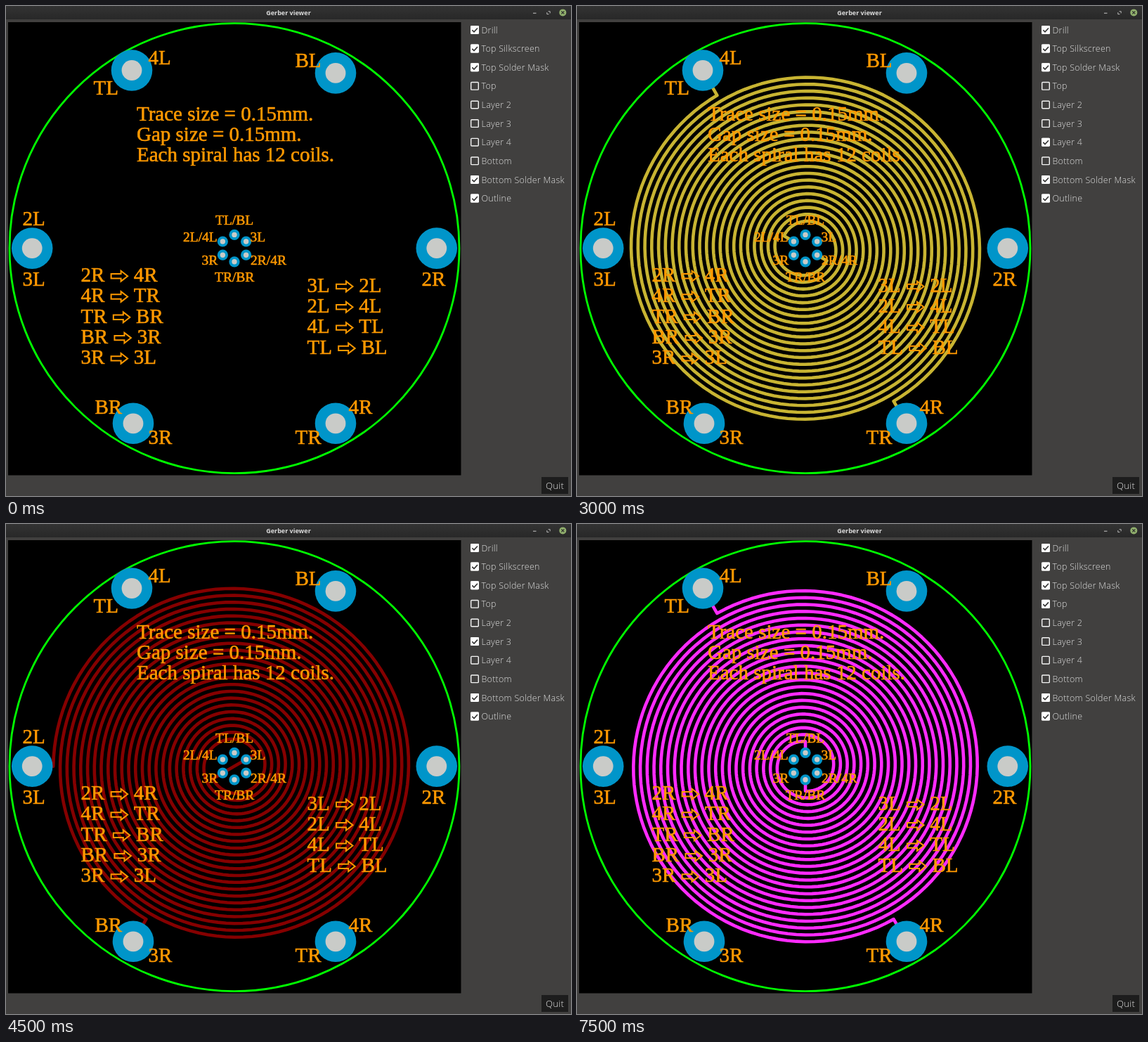
An HTML page that plays this animation: 804 px wide and 697 px high, repeating every 9 s.

```html
<!DOCTYPE html>
<html lang="en">
<head>
<meta charset="utf-8">
<title>Gerber viewer</title>
<style>
html, body { margin: 0; width: 100%; height: 100%; overflow: hidden; background: #41403f; }
svg { display: block; width: 804px; height: 697px; }
.silk { font-family: "Liberation Serif", serif; fill: #ff9900; stroke: #ff9900; stroke-width: .6; }
.ui { font-family: "Open Sans", sans-serif; font-weight: 300; font-size: 12.5px; fill: #dedede; }
.title { font: bold 9px "Noto Sans", sans-serif; fill: #dadada; text-anchor: middle; }
</style>
</head>
<body>
<svg id="stage" viewBox="0 0 804 697" xmlns="http://www.w3.org/2000/svg">
  <defs>
    <linearGradient id="bar" x2="0" y2="1">
      <stop stop-color="#333333"/><stop offset="1" stop-color="#282828"/>
    </linearGradient>
  </defs>
  <rect width="804" height="697" fill="#41403f"/>
  <rect width="804" height="19" fill="url(#bar)"/>
  <text class="title" x="402" y="13">Gerber viewer</text>
  <g fill="none" stroke="#c8c8c8">
    <path d="M750 10.2h4.5"/>
    <path d="M771.6 7.7h2.6v2.6M769.8 9v2.6h2.6" stroke-width=".9"/>
  </g>
  <circle cx="792.3" cy="9.4" r="5" fill="#91b06d"/>
  <path d="M790.3 7.4l4 4m0-4l-4 4" stroke="#2b2b2b" stroke-width="1.2"/>
  <rect x="3" y="23" width="644.5" height="644.5"/>
  <g id="board"></g>
  <g id="panel"></g>
  <rect x="762" y="670" width="38" height="24" fill="#1d1d1d"/>
  <text class="ui" x="768" y="686.5" style="font-size:13.2px" letter-spacing=".25">Quit</text>
</svg>
<script>
const CX = 325, CY = 344.6, MM = 32;
const R_IN = 1.1 * MM, R_OUT = 7.85 * MM;
const PITCH = (R_OUT - R_IN) / (11 * 360 + 30);
const STEP = 1500;
const board = document.getElementById("board");
const panel = document.getElementById("panel");

function add(parent, tag, attrs, text) {
  const el = document.createElementNS("http://www.w3.org/2000/svg", tag);
  for (const key in attrs) el.setAttribute(key, attrs[key]);
  if (text) el.textContent = text;
  parent.appendChild(el);
  return el;
}

function polar(r, deg) {
  const a = deg * Math.PI / 180;
  return (CX + r * Math.cos(a)).toFixed(2) + " " + (CY - r * Math.sin(a)).toFixed(2);
}

// One coil: inner stub, spiral growing by PITCH per degree, outer stub to the pad.
function coil(start, dir, extra, inner) {
  const sweep = 11 * 360 + extra;
  const pts = [polar(inner, start)];
  for (let a = 0; a <= sweep; a += 3) pts.push(polar(R_IN + PITCH * a, start + dir * a));
  pts.push(polar(9 * MM, start + dir * sweep));
  return "M" + pts.join("L");
}

function copper(color, dir, arms, inner = 0.6 * MM) {
  return add(board, "path", {
    d: arms.map(([start, extra]) => coil(start, dir, extra, inner)).join(""),
    fill: "none", stroke: color, "stroke-width": 4.6,
    "stroke-linecap": "round", "stroke-linejoin": "round"
  });
}

const layers = [
  { row: 7, path: copper("#2b2dff", -1, [[90, 30], [270, 30]]) },
  { row: 6, path: copper("#c8b432", -1, [[150, 30], [330, 30]]) },
  { row: 5, path: copper("#850000", 1, [[210, 30], [30, 150]], 0) },
  { row: 4, path: copper("#00008b", 1, [[150, 30], [330, 30]]) },
  { row: 3, path: copper("#ff2bff", 1, [[90, 30], [270, 30]]) }
];

add(board, "circle", { cx: CX, cy: CY, r: 10 * MM, fill: "none", stroke: "#00ff00", "stroke-width": 2.8 });

function pad(cx, cy, r, hole) {
  add(board, "circle", { cx, cy, r, fill: "#0095c9" });
  add(board, "circle", { cx, cy, r: hole, fill: "#c9cbc8" });
}
[[179, 91.5], [469, 95.4], [37.2, CY], [612.8, CY], [181, 593.8], [469, 593.8]]
  .forEach(([x, y]) => pad(x, y, 29.3, 14.4));
for (let a = 30; a < 390; a += 60) pad(...polar(0.6 * MM, a).split(" "), 7.6, 3.7);

function silk(x, y, text, size = 29) {
  return add(board, "text", { class: "silk", x, y, "font-size": size }, text);
}
[[202.5, 82.5, "4L"], [124.5, 126, "TL"], [411.5, 86.5, "BL"], [23.5, 311.5, "2L"],
 [23.5, 397.5, "3L"], [591.5, 397.5, "2R"], [126.5, 579.5, "BR"], [202.5, 622.5, "3R"],
 [487.5, 579.5, "4R"], [411.5, 622.5, "TR"]].forEach(l => silk(...l));
[[298, 311, "TL/BL"], [252, 335, "2L/4L"], [347.5, 335, "3L"], [278.5, 367.5, "3R"],
 [348, 367.5, "2R/4R"], [297, 391.5, "TR/BR"]].forEach(l => silk(...l, 19.5));
["Trace size = 0.15mm.", "Gap size = 0.15mm.", "Each spiral has 12 coils."]
  .forEach((s, i) => silk(186, 162.5 + i * 29.3, s));

function route(x, y, from, to) {
  const a = x + silk(x, y, from).getComputedTextLength() + 7.25;
  add(board, "path", {
    d: `M${a + 2} ${y - 11}h14v-4.2l9.5 7.4l-9.5 7.4v-4.2h-14z`,
    fill: "none", stroke: "#ff9900", "stroke-width": 2
  });
  silk(a + 34.25, y, to);
}
["2R 4R", "4R TR", "TR BR", "BR 3R", "3R 3L"]
  .forEach((s, i) => route(106.5, 392 + i * 29.3, ...s.split(" ")));
["3L 2L", "2L 4L", "4L TL", "TL BL"]
  .forEach((s, i) => route(428.5, 406.8 + i * 29.3, ...s.split(" ")));

const names = ["Drill", "Top Silkscreen", "Top Solder Mask", "Top", "Layer 2", "Layer 3",
  "Layer 4", "Bottom", "Bottom Solder Mask", "Outline"];
const ticks = names.map((name, i) => {
  const y = 34 + i * 26.62;
  add(panel, "rect", { x: 661.7, y: y - 5.3, width: 10.6, height: 10.6, rx: 1,
    fill: "none", stroke: "#f4f4f4", "stroke-width": 1.4 });
  const tick = add(panel, "g", {});
  add(tick, "rect", { x: 661, y: y - 6, width: 12, height: 12, rx: 1.4, fill: "#fff" });
  add(tick, "path", { d: `M663.3 ${y + .2}l2.7 2.7l5-5.4`, fill: "none", stroke: "#333", "stroke-width": 1.6 });
  add(panel, "text", { class: "ui", x: 676.5, y: y + 4.6, "letter-spacing": .25 }, name);
  return tick;
});

const show = (el, on) => el.setAttribute("visibility", on ? "visible" : "hidden");

function draw(time) {
  const step = Math.floor(time / STEP) % (layers.length + 1);
  layers.forEach(({ row, path }, i) => {
    const on = step === i + 1;
    show(path, on);
    show(ticks[row], on);
  });
}

const begin = performance.now();
function loop() {
  draw(performance.now() - begin);
  requestAnimationFrame(loop);
}
loop();
</script>
</body>
</html>
```
